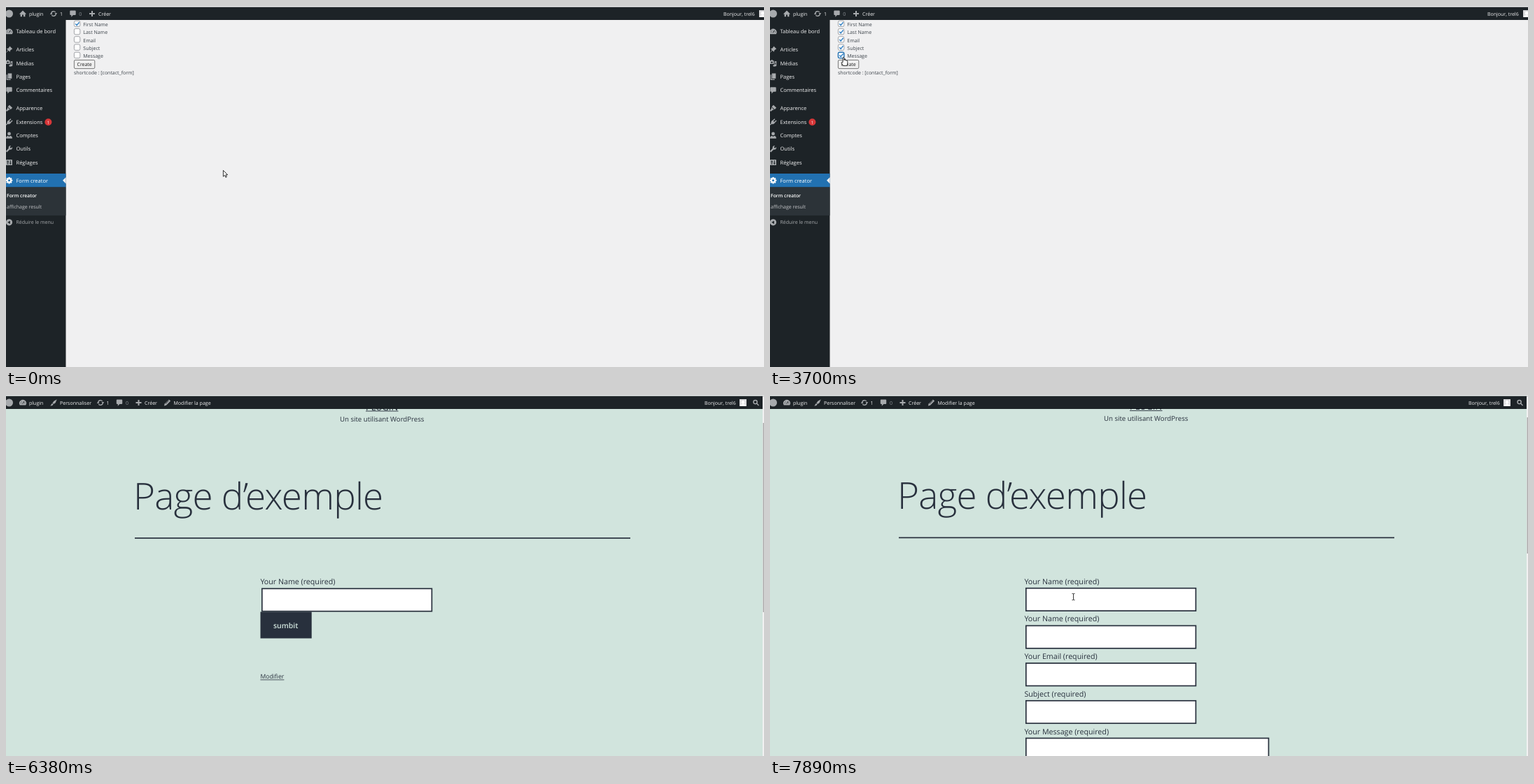
These frames come from a looping animation (1083 px wide and 517 px high, 8 s). An HTML page:

```html
<!DOCTYPE html>
<html lang="fr">
<head>
<meta charset="utf-8">
<title>Form creator</title>
<style>
html, body { margin: 0; width: 100%; height: 100%; overflow: hidden; background: #f0f0f1; }
svg { display: block; }
text { font-family: "Open Sans", "Noto Sans", sans-serif; text-rendering: geometricPrecision; white-space: pre; }
.icon { fill: #a7aaad; stroke: none; }
.line { fill: none; stroke: #a7aaad; stroke-width: 1.4; }
.cut { fill: none; stroke: #1d2327; stroke-width: 1; }
</style>
</head>
<body>
<svg id="stage" width="1083" height="517" viewBox="0 0 1083 517"></svg>
<script>
const LOOP = 8000;
const DARK = '#1d2327', INK = '#28303d', PALE = '#f0f0f1';

const rect = (x, y, w, h, fill, more = '') =>
  `<rect x="${x}" y="${y}" width="${w}" height="${h}" fill="${fill}" ${more}/>`;
const text = (s, x, y, size, fill, more = '') =>
  `<text x="${x}" y="${y}" font-size="${size}" fill="${fill}" ${more}>${s}</text>`;
const path = (d, cls = 'icon') => `<path class="${cls}" d="${d}"/>`;

// Icons are drawn around their own centre, about 10 px wide
const ICONS = {
  mark: '<circle class="icon" r="5.5"/>',
  gauge: path('M-4.2 3.6A5 5 0 1 1 4.2 3.6Z') + path('M-.3 1.6L2-2M-3.2 .4h1M2.4 .4h1M-2-2.2l.5.6', 'cut'),
  pin: path('M.8-4.8L4.8-.8L3.6-.3L1.6 1.4L1.2 3.4L-1 1.3L-4.6 4.6L-1.7 .7L-3.7-1.3L-1.5-1.6L.3-3.6Z'),
  media: path('M-4.8-3.6h1.4l.6-1h2l.6 1h1.2v4.6h-5.8Z') + '<circle r="1.2" cx="-1.9" cy="-1.2" fill="#1d2327"/>' +
    path('M2-2.4L4.8-3v6.2a1.5 1.3 0 1 1-1-1.2v-3L2.8-.8v4.4a1.5 1.3 0 1 1-1-1.2Z'),
  pages: path('M-1.8-4.8h5.6v7.4h-5.6Z') + path('M-3.8-3h1.2v6.4h4.8v1.2h-6Z'),
  comment: path('M-3.2-4.4h6.4q1 0 1 1v4.4q0 1-1 1h-2.8l-2.6 2.8v-2.8h-1q-1 0-1-1v-4.4q0-1 1-1Z'),
  roller: path('M.4-4.6L4.6-.6L2.2 1.8L-2-2.2Z') + path('M-2.4-1.4L1.2 2.2L-.6 2.6L-3.4 4.6L-4.6 3.6L-2.6 .6Z'),
  brush: path('M4.8-4.8L2.6.2L0 2L-1.6 .4L.4-2.2Z') + path('M-2 1L-.4 2.6Q-1.4 4.8-4.8 4.4Q-3.4 3.4-3.2 2.2Z'),
  plug: path('M-1.4-1.6L2 1.8Q.2 4-2.2 3L-4 4.8L-4.8 4L-3-2.2+0Z'.replace('L-3-2.2+0Z', 'L-3 2.2Q-3.6 0-1.4-1.6Z')) +
    path('M-.4-1.4L2.4-4.2M1.8 .8L4.6-2', 'line') + path('M-1-2.4L2.8 1.4L1.6 2.2L-2-1.4Z'),
  user: '<circle class="icon" cy="-2.4" r="2.4"/>' + path('M-4.4 4.4Q-4.6 .8-1.6.6L0 1.8L1.6.6Q4.6.8 4.4 4.4Z'),
  wrench: path('M4.5-2.6A2.8 2.8 0 0 1 .9.8L-3.2 4.7L-4.7 3.2L-.7-.9A2.8 2.8 0 0 1 2.6-4.6L1.2-3L1.6-1.6L3-1.2Z'),
  sliders: rect(-4.4, -4, 8.8, 8, '#a7aaad', 'rx=".6"') + path('M-1.8-3V3M1.8-3V3M-3-1h2.4M.6 1h2.4', 'cut'),
  collapse: '<circle class="icon" r="4.6"/>' + '<path fill="#1d2327" d="M1.4-2.4v4.8L-2.2 0Z"/>',
  home: path('M0-4.6L4.8 .2L4 1L3.4 .4V4.2H1V1.4H-1V4.2H-3.4V.4L-4 1L-4.8.2Z'),
  refresh: path('M-3.4-.6A3.5 3.5 0 0 1 2.7-2.1M3.4.6A3.5 3.5 0 0 1-2.7 2.1', 'line') +
    path('M5.2-1H1.4L3.4 1.4ZM-5.2 1H-1.4L-3.4-1.4Z'),
  plus: path('M-1-4h2v3h3v2h-3v3h-2v-3h-3v-2h3Z'),
  pencil: path('M2.4-4.6L4.6-2.4L-1.6 3.8L-4.6 4.6L-3.8 1.6Z') + path('M-2.6 1.6L2-3', 'cut'),
  search: '<circle class="line" cx="-.9" cy="-.9" r="2.6"/>' + path('M1 1L4 4', 'line'),
  gear: Array.from({ length: 4 }, (_, i) => rect(-1.1, -4.8, 2.2, 9.6, '#fff', `transform="rotate(${i * 45})"`)).join('') +
    '<circle r="3.5" fill="#fff"/><circle r="1.5" fill="#2271b1"/>'
};
const icon = (name, x, y) => `<g transform="translate(${x} ${y})">${ICONS[name]}</g>`;

// Each entry: icon, icon x, label, label x
function bar(items, helloX) {
  let s = rect(0, 0, 1083, 1.5, '#f6f6f6') + rect(0, 1.5, 1083, 18.5, DARK) + icon('mark', 4.5, 11);
  for (const [name, ix, label, lx] of items)
    s += icon(name, ix, 11) + text(label, lx, 13.6, 7.05, label === '0' ? '#8c9196' : PALE);
  return s + text('Bonjour, trel6', helloX, 13.6, 7, PALE);
}
const avatar = x => rect(x, 6, 10, 10, '#dcdcde') +
  `<path d="M${x + 1} 16q.4-3 4-3t4 3Z" fill="#fff"/><circle cx="${x + 5}" cy="10.4" r="2.3" fill="#fff"/>`;

function adminPage() {
  const menu = [
    ['gauge', 'Tableau de bord', 36.7], ['pin', 'Articles', 62.4], ['media', 'Médias', 81.9],
    ['pages', 'Pages', 101.3], ['comment', 'Commentaires', 120.7], ['roller', 'Apparence', 146.4],
    ['plug', 'Extensions', 165.9], ['user', 'Comptes', 185.3], ['wrench', 'Outils', 204.7],
    ['sliders', 'Réglages', 224.1]
  ];
  let s = rect(0, 0, 1083, 517, PALE) + rect(0, 20, 85.5, 497, DARK) +
    rect(0, 240, 85.5, 19.5, '#2271b1') + rect(0, 259.5, 85.5, 40.5, '#2c3338') +
    `<path d="M85.6 245.2V254.4L81 249.8Z" fill="${PALE}"/>`;
  for (const [name, label, y] of menu)
    s += icon(name, 4.5, y) + text(label, 14.5, y + 2.7, 7.52, PALE);
  s += '<circle cx="60.4" cy="166.3" r="5" fill="#d63638"/>' +
    text('1', 60.4, 168.5, 6, '#fff', 'text-anchor="middle"') +
    icon('gear', 4.5, 249.8) + text('Form creator', 14.5, 252.5, 7.5, '#fff') +
    text('Form creator', 1, 274.2, 6.85, '#fff', 'font-weight="600"') +
    text('affichage result', 1, 290, 7, '#c3c4c7') +
    icon('collapse', 4.5, 309.8) + text('Réduire le menu', 14.5, 312.4, 7, '#a7aaad');
  ['First Name', 'Last Name', 'Email', 'Subject', 'Message'].forEach((label, i) => {
    const y = 21.2 + i * 11.25;
    s += rect(97.4, y, 8.4, 8.4, '#fff', `class="box" rx="2" stroke="#8c8f94" stroke-width=".8"`) +
      `<path class="tick" d="M99.2 ${y + 4.4}l1.9 2l3.5-4.4" fill="none" stroke="#3582c4" stroke-width="1.5"/>` +
      text(label, 110.3, y + 8, 7, '#3c434a');
  });
  return s + rect(97.4, 77.4, 29.4, 12.2, '#efefef', 'id="create" rx="1.6" stroke="#6b6b6b" stroke-width=".9"') +
    text('Create', 101.6, 86.3, 6.9, '#1a1a1a') +
    text('shortcode : [contact_form]', 97, 97.7, 6.98, '#3c434a') +
    bar([['home', 24, 'plugin', 33], ['refresh', 68, '1', 77], ['comment', 95.5, '0', 104.3],
      ['plus', 123, 'Créer', 132]], 1025) + avatar(1076);
}

function field(label, y, w = 242.6, h = 32.4) {
  return text(label + ' (required)', 363.4, y + 271.4, 10.66, INK) +
    rect(365.8, y + 277.3, w, h, '#fff', `stroke="${INK}" stroke-width="1.7"`);
}

function sitePage(full) {
  let s = rect(0, 0, 1083, 517, '#d1e4dd');
  let body = text('PLUGIN', 514, 21.6, 12.8, INK) + rect(514, 22.6, 46.5, .9, INK) +
    text('Un site utilisant WordPress', 477, 37.9, 9.63, INK) +
    text('Page d’exemple', 182, 163.6, 53, INK, 'font-weight="300" letter-spacing="-.8"') +
    rect(184, 204.1, 708, 1.7, INK);
  if (full) {
    ['Your Name', 'Your Name', 'Your Email', 'Subject'].forEach((f, i) => body += field(f, i * 53.7));
    body += field('Your Message', 214.8, 346.6, 100);
  } else {
    body += field('Your Name', 0) + rect(363.5, 310.5, 73.2, 38, INK) +
      text('sumbit', 382, 333.8, 10.5, '#d1e4dd', 'font-weight="600"') +
      text('Modifier', 363.4, 405.6, 8.65, INK) + rect(363.4, 407.5, 34, .8, INK);
  }
  const [top, size] = full ? [32, 195] : [40, 271];
  return s + `<g transform="translate(0 ${full ? -.6 : 0})">${body}</g>` +
    bar([['gauge', 24, 'plugin', 33], ['brush', 68, 'Personnaliser', 77], ['refresh', 135, '1', 143.6],
      ['comment', 162, '0', 171], ['plus', 189.5, 'Créer', 198], ['pencil', 230.5, 'Modifier la page', 239.5]], 998) +
    avatar(1048) + icon('search', 1071.5, 11) +
    rect(1081, 1.5, 2, 515.5, '#f1f1f1') + rect(1081.6, top, 1.4, size, '#a9a9a9');
}

const outline = 'stroke-width=".8" stroke-linejoin="round"';
const CURSORS = {
  arrow: `<path d="M.4 .4V9.2L2.5 7.3L3.9 10.4L5.3 9.8L4 6.8H6.7Z" fill="#fff" stroke="#000" ${outline}/>`,
  beam: '<path d="M-2-4.6H-.6L0-4.2L.6-4.6H2M0-4.2V4.2M-2 4.6H-.6L0 4.2L.6 4.6H2" fill="none" stroke="#222" stroke-width=".9"/>',
  hand: `<path d="M-.9 7.6V1.2Q0-.4 1 1.2V4.6Q2-.0 2.7 4.8Q3.6 4.2 4.3 5.2Q5.6 4.8 5.8 6.2V9.2L4.8 12.6H-.2L-2.8 8.6Q-3.2 6.6-.9 7.6Z" fill="#fff" stroke="#000" ${outline}/>`
};

// Pointer: time, shape, x, y
const POINTER = [
  [0, 'arrow', 310, 235], [140, 'arrow', 331, 257], [520, 'arrow', 322, 247], [650, 'arrow', 290, 215],
  [780, 'arrow', 235, 160], [900, 'arrow', 175, 105], [1030, 'arrow', 130, 73], [1160, 'beam', 110.5, 58.5],
  [1290, 'beam', 110, 46], [1420, 'hand', 104, 36], [1570, 'hand', 107, 34], [1720, 'hand', 109, 35],
  [1870, 'hand', 105, 36], [2160, 'hand', 104, 39], [2290, 'hand', 102, 43], [2420, 'hand', 101, 46],
  [2560, 'hand', 100, 50], [2690, 'hand', 98.5, 55], [2980, 'hand', 99, 56], [3120, 'hand', 101, 58],
  [3270, 'hand', 100, 62], [3410, 'hand', 100, 66], [3560, 'hand', 101, 69], [3700, 'hand', 105, 73],
  [3850, 'arrow', 118, 79], [3990, 'arrow', 130, 81], [4130, 'arrow', 131, 81], [4260, 'arrow', 190, 71],
  [4390, 'arrow', 320, 52], [4530, 'arrow', 500, 28], [4660, 'arrow', 670, 4], [4790, ''],
  [5990, 'arrow', 622, 200], [6120, 'arrow', 400, 95], [6250, 'arrow', 130, 5], [6380, ''],
  [6990, 'arrow', 60, 4], [7120, 'arrow', 170, 70], [7250, 'arrow', 330, 118], [7380, 'beam', 441.5, 170],
  [7530, 'arrow', 438, 215], [7680, 'arrow', 435, 262], [7890, 'beam', 433.5, 289]
];
const PAGES = [[0, 0], [5510, 1], [7680, 2]];
const CHECKED = [0, 1420, 2420, 3120, 3560];
const FOCUS = [[0, -1], [1420, 1], [2420, 2], [3120, 3], [3560, 4], [4130, 5], [4390, -1]];

const stage = document.getElementById('stage');
stage.innerHTML = [adminPage(), sitePage(false), sitePage(true)].map(p => `<g class="page">${p}</g>`).join('') +
  Object.entries(CURSORS).map(([k, d]) => `<g id="${k}">${d}</g>`).join('');
const all = q => [...stage.querySelectorAll(q)];
const pages = all('.page'), ticks = all('.tick'), targets = [...all('.box'), ...all('#create')];
const pointers = Object.keys(CURSORS).map(k => document.getElementById(k));

const at = (steps, t) => steps.findLast(s => s[0] <= t);
const show = (el, on) => el.setAttribute('visibility', on ? 'visible' : 'hidden');

function draw(t) {
  const page = at(PAGES, t)[1], focus = at(FOCUS, t)[1];
  pages.forEach((p, i) => p.style.display = i === page ? '' : 'none');
  ticks.forEach((el, i) => show(el, t >= CHECKED[i]));
  targets.forEach((el, i) => {
    el.style.stroke = i === focus ? '#2271b1' : '';
    el.style.strokeWidth = i === focus ? 1.4 : '';
  });
  const [, shape, x, y] = at(POINTER, t);
  for (const el of pointers) {
    show(el, el.id === shape);
    if (el.id === shape) el.setAttribute('transform', `translate(${x} ${y})`);
  }
}

const start = performance.now();
function tick() {
  draw((performance.now() - start) % LOOP);
  requestAnimationFrame(tick);
}
tick();
</script>
</body>
</html>
```
